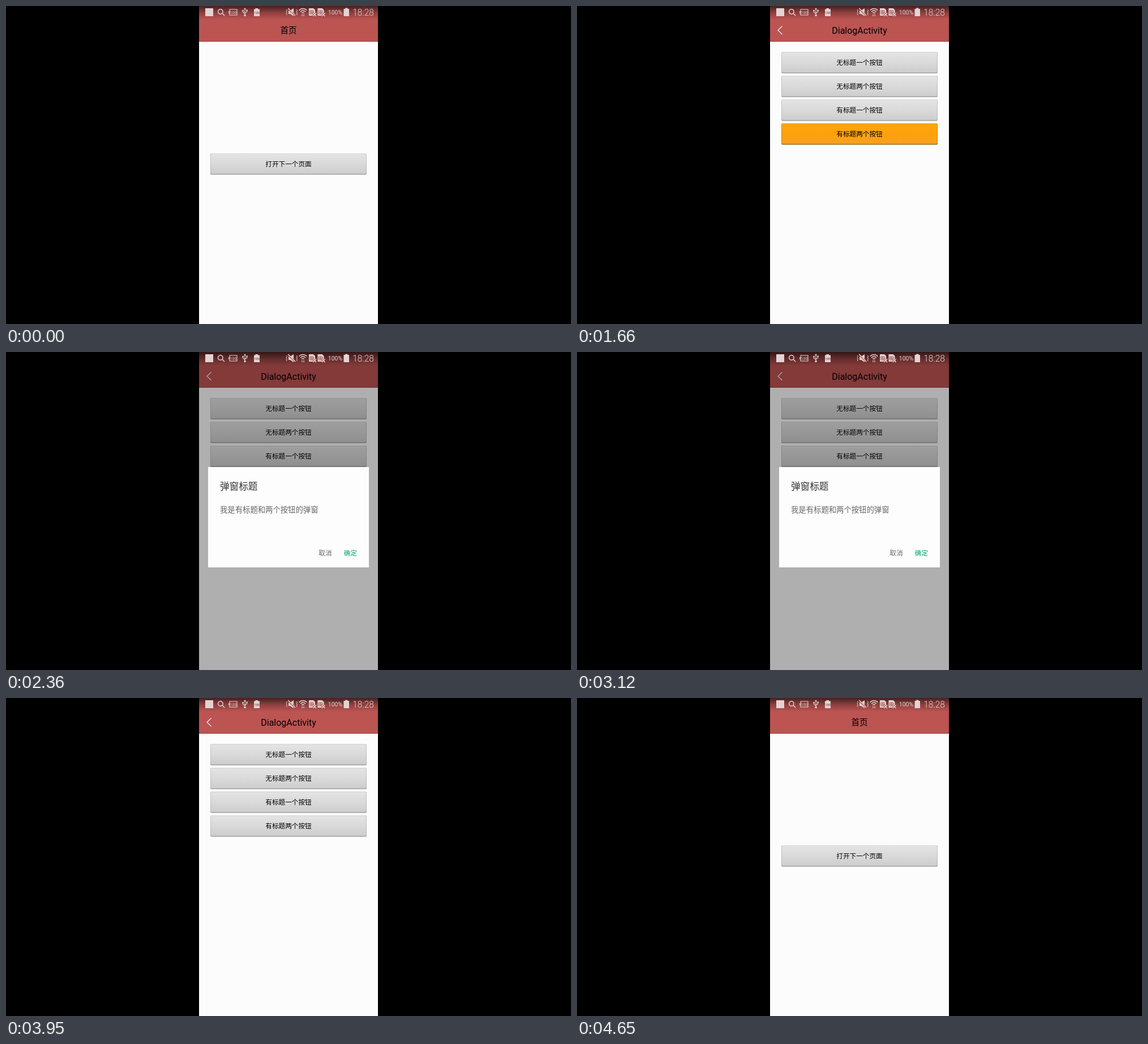
An HTML page with a canvas for the animation above (5.4 s loop, 998 by 561 pixels).

```html
<!DOCTYPE html>
<html lang="zh-CN">
<head>
<meta charset="utf-8">
<style>
html, body { margin: 0; width: 100%; height: 100%; overflow: hidden; background: #000 }
canvas { display: block }
</style>
</head>
<body>
<canvas id="stage" width="998" height="561"></canvas>
<script>
const g = document.getElementById('stage').getContext('2d');
const LOOP = 5400, STEP = LOOP / 85;
const LEFT = 341, WIDTH = 316, HEIGHT = 561, MID = 499;
const FONT = 'Roboto, "Noto Sans CJK SC", "Noto Sans CJK", sans-serif';
const ICON = '#e4d3d3';
const LABELS = ['无标题一个按钮', '无标题两个按钮', '有标题一个按钮', '有标题两个按钮'];

const clamp = x => Math.max(0, Math.min(1, x));
const progress = (t, start, length) => clamp((t - start) / length);

function rect(x, y, w, h, fill) {
  g.fillStyle = fill;
  g.fillRect(x, y, w, h);
}

function round(x, y, w, h, r, fill) {
  g.fillStyle = fill;
  g.beginPath();
  g.roundRect(x, y, w, h, r);
  g.fill();
}

// y is the visual centre of the line
function text(str, x, y, size, color = '#000', align = 'center', weight = 400) {
  g.font = `${weight} ${size}px ${FONT}`;
  g.textAlign = align;
  g.fillStyle = color;
  g.fillText(str, x, y + size * 0.37);
}

function stroke(path, width = 1.2, color = ICON) {
  g.lineWidth = width;
  g.strokeStyle = color;
  g.stroke(new Path2D(path));
}

function shape(path, color = ICON) {
  g.fillStyle = color;
  g.fill(new Path2D(path));
}

// Draws a layer scaled around the point (MID, cy)
function layer(alpha, scale, cy, draw) {
  g.save();
  g.globalAlpha = alpha;
  g.translate(MID, cy);
  g.scale(scale, scale);
  g.translate(-MID, -cy);
  draw();
  g.restore();
}

function button(label, y, pressed) {
  const face = g.createLinearGradient(0, y, 0, y + 36);
  face.addColorStop(0, pressed ? '#ffa70c' : '#e4e4e4');
  face.addColorStop(0.5, pressed ? '#fda10a' : '#dadada');
  face.addColorStop(1, pressed ? '#f7a021' : '#cdcdcd');
  round(361, y, 276, 37.5, 2, pressed ? '#96731f' : '#a0a0a0');
  round(361.5, y, 275, 36, 2, face);
  rect(363, y, 272, 1, pressed ? '#e9a02c' : '#d6d6d6');
  text(label, MID, y + 18.8, 11.65);
}

function page(title, size) {
  rect(LEFT, 0, WIDTH, HEIGHT, '#fcfcfd');
  rect(LEFT, 0, WIDTH, 63, '#bc5452');
  rect(LEFT, 62, WIDTH, 1, '#994340');
  text(title, MID, 43, size);
}

function home(pressed) {
  page('首页', 14.6);
  button('打开下一个页面', 260, pressed);
}

function activity(pressed) {
  page('DialogActivity', 16);
  stroke('M362.5 35.5L355 42.7L362.5 50', 1.3, '#f8eeee');
  LABELS.forEach((label, i) => button(label, 81.3 + i * 42, pressed && i === 3));
}

function dialog() {
  rect(357, 203, 284, 177, '#fdfdfd');
  text('弹窗标题', 378, 236.5, 16.6, '#333', 'left');
  text('我是有标题和两个按钮的弹窗', 378, 278.3, 13.35, '#666', 'left');
  text('取消', 564, 354.7, 11.65, '#666');
  text('确定', 608.5, 354.7, 11.65, '#00a869');
}

function sim(x) {
  shape(`M${x} 4h8l3 3v10h-11z`);
  stroke(`M${x + 2} 8h6v6h-6zM${x + 5} 8v6M${x + 2} 11h6`, 0.9, '#a04a49');
  stroke(`M${x + 7} 12l6 6m0 -6l-6 6`, 2.6, '#a95150');
  stroke(`M${x + 7.5} 12.5l5.5 5.5m0 -5.5l-5.5 5.5`, 1.3);
}

function statusBar() {
  const shade = g.createLinearGradient(0, 0, 0, 24);
  shade.addColorStop(0, 'rgba(0,0,0,.62)');
  shade.addColorStop(0.5, 'rgba(0,0,0,.24)');
  shade.addColorStop(1, 'rgba(0,0,0,0)');
  rect(LEFT, 0, WIDTH, 24, shade);

  rect(352, 4, 14, 14, ICON);
  stroke('M383 10a4.2 4.2 0 1 0-8.4 0a4.2 4.2 0 1 0 8.4 0M382 13l4 4', 1.5);
  stroke('M395 6h13v10h-13zM393.8 9v4', 1.1);
  text('100', 401.5, 11, 7, ICON);
  stroke('M422 5v11M418.5 8.5v2.5l3.5 2.5M425.5 8v2.5l-3.5 2', 1.1);
  shape('M422 3l2 3h-4zM420.5 15h3v3h-3zM417.3 7h2.4v2.4h-2.4zM424.3 6.5h2.4v2.4h-2.4z');
  shape('M440.5 4h4.5v1.5h3v12.5h-10v-12.5h2.5z');
  text('100', 443, 12, 5.6, '#8d4241', 'center', 500);

  stroke('M495 6l1.5 2l-1.5 2l1.5 2l-1.5 2l1.5 2M513 6l1.5 2l-1.5 2l1.5 2l-1.5 2l1.5 2', 1);
  shape('M499 8h3l6 -4v14l-6 -4h-3z');
  stroke('M498 4.5l13 12.5', 2.6, '#9b4746');
  stroke('M498.5 4l12.5 13', 1.3);
  stroke('M517.5 7.5q7 -6 14 0M520 10q4.5 -4 9 0M522.3 12.3q2.2 -1.8 4.4 0', 1.5);
  stroke('M523 14.5v3.5M526 14.5v3.5', 1.1);
  sim(535);
  sim(550.5);
  text('100%', 594, 11.3, 10.4, ICON, 'right');
  shape('M599.3 3.5h4v1.5h2.7v13h-9.5v-13h2.8z');
  text('18:28', 650, 11, 15.6, ICON, 'right', 300);
}

function render(now) {
  const t = Math.floor((now % LOOP) / STEP + 0.04) * STEP;
  rect(0, 0, 998, HEIGHT, '#000');
  g.save();
  g.beginPath();
  g.rect(LEFT, 0, WIDTH, HEIGHT);
  g.clip();

  home(t > 315 && t < 640);

  const enter = progress(t, 700, 300);
  const u = progress(t, 3920, 600);
  const swipe = u ** 3 / (u ** 3 + 2.94 * (1 - u) ** 3);
  if (enter > 0 && swipe < 1) {
    if (swipe > 0) rect(LEFT, 0, WIDTH, HEIGHT, `rgba(0,0,0,${0.38 * (1 - swipe)})`);
    g.save();
    g.translate(Math.round(swipe * WIDTH), 0);
    layer(Math.min(1, enter * 3.6), 1 - 0.33 * (1 - enter) ** 2, HEIGHT / 2,
      () => activity(t > 1650 && t < 1980));
    g.restore();
  }

  const show = progress(t, 2010, 280), hide = progress(t, 3240, 166);
  const dim = 0.305 * show * (1 - hide);
  if (dim > 0) {
    rect(LEFT, 0, WIDTH, HEIGHT, `rgba(0,0,0,${dim})`);
    const fade = (1 - (1 - show) ** 3) * clamp(1 - hide * 1.5);
    layer(fade, 1 - 0.1 * (1 - show) ** 4 - 0.1 * hide, 291.5, dialog);
  }

  statusBar();
  g.restore();
}

const start = performance.now();
(function tick() {
  render(performance.now() - start);
  requestAnimationFrame(tick);
})();
</script>
</body>
</html>
```
